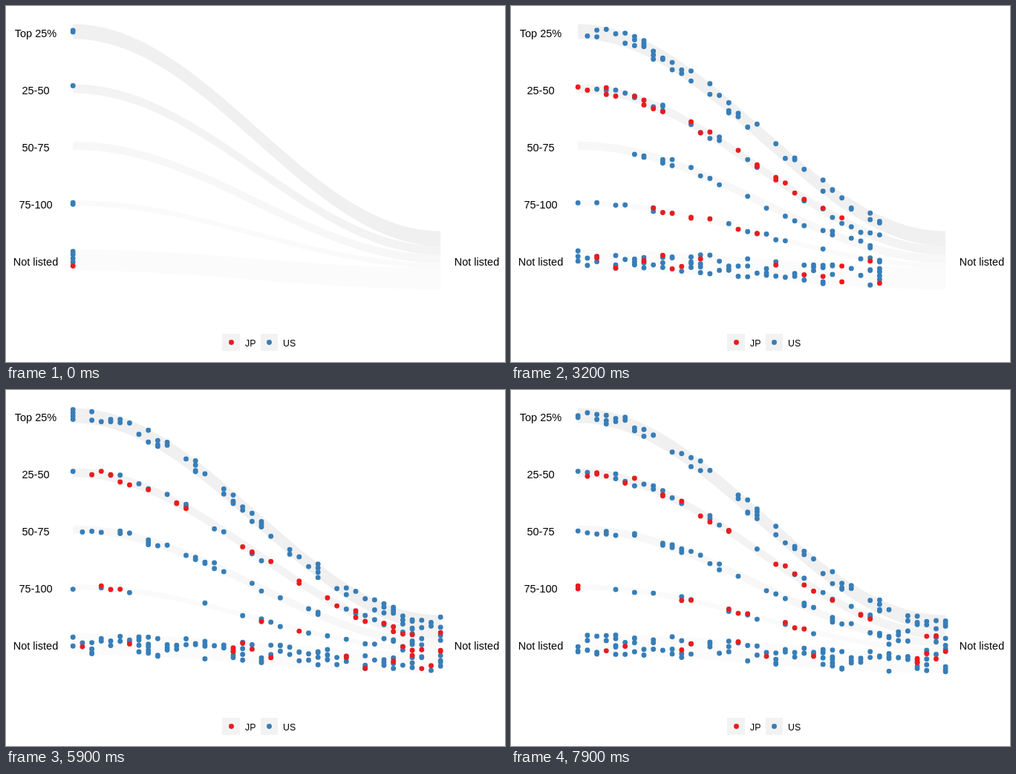
Write an HTML page that moves like this. It is 672x480 px and loops after 8000 ms.

```html
<!DOCTYPE html>
<html lang="en">
<head>
<meta charset="utf-8">
<title>Flow to Not listed</title>
<style>
  html, body { margin: 0; width: 100%; height: 100%; overflow: hidden; background: #fff; }
  svg { display: block; }
  text { font-family: "Liberation Sans", Arial, sans-serif; font-size: 14.5px; fill: #000; }
  .label { text-anchor: middle; }
  .key { font-size: 12.3px; }
  .box { fill: #f2f2f2; }
  .dots { fill: none; stroke-width: 6.9; stroke-linecap: round; }
  .us { stroke: #377eb8; }
  .jp { stroke: #e81c1e; }
</style>
</head>
<body>
<svg width="672" height="480" viewBox="0 0 672 480">
  <g id="bands"></g>
  <path id="us" class="dots us"/>
  <path id="jp" class="dots jp"/>
  <g id="labels"></g>
  <rect class="box" x="291" y="442" width="24" height="23"/>
  <rect class="box" x="343" y="442" width="23" height="23"/>
  <path class="dots jp" d="M303.5 453.5h0"/>
  <path class="dots us" d="M354.5 453.5h0"/>
  <text class="key" x="322" y="459">JP</text>
  <text class="key" x="373" y="459">US</text>
</svg>
<script>
const LEFT = 90.2, RIGHT = 585.2, LAST = 39, STEPS = 79;

// y0, y1: band centre at each end; jp: steps at which a red dot sets off;
// us: mean number of blue dots per step; first: blue offsets at step 0
const rows = [
  { name: 'Top 25%', y0: 34.5, y1: 313.5, h: 20, fill: '#f0f0f0', us: 1.65, first: [-1.5, 0.5], jp: [] },
  { name: '25-50', y0: 111.5, y1: 329.5, h: 12, fill: '#f3f3f3', us: 0.75, first: [-4], jp: [
    4, 6, 8, 9, 10, 11, 11, 13, 13, 15, 18, 19, 20, 23, 24, 25, 25, 26, 28, 29, 29, 31, 32, 35, 35, 38,
    40, 41, 47, 48, 48, 51, 53, 54, 55, 56, 57, 62, 62, 64, 65, 67, 69, 69, 72, 73, 75, 76, 76, 77] },
  { name: '50-75', y0: 188.3, y1: 341, h: 11, fill: '#f7f7f7', us: 1, first: [], jp: [] },
  { name: '75-100', y0: 265.7, y1: 350, h: 7, fill: '#fafafa', us: 0.45, first: [-0.5, 1.5], jp: [
    1, 13, 15, 18, 20, 20, 22, 23, 24, 35, 39, 54, 55, 56, 60, 61, 62, 66, 67, 78, 78] },
  { name: 'Not listed', y0: 342.5, y1: 367.7, h: 28.5, fill: '#fbfbfb', us: 2.6, first: [-11.5, -7.5, -2, 3], jp: [
    0, 4, 4, 6, 8, 11, 19, 21, 22, 23, 25, 25, 28, 30, 30, 38,
    40, 41, 42, 42, 53, 58, 61, 66, 67, 73, 75] }
];

const $ = id => document.getElementById(id);
const xAt = p => LEFT + (RIGHT - LEFT) * p;
const yAt = (row, p) => row.y0 + (row.y1 - row.y0) * (1 - Math.cos(Math.PI * p)) / 2;

let seed = 20;
const random = () => (seed = seed * 16807 % 2147483647) / 2147483647;
const spread = row => (random() - 0.5) * (row.h - 1);

function bandPath(row) {
  const top = [], bottom = [];
  for (let i = 0; i <= 100; i++) {
    const x = xAt(i / 100).toFixed(1), y = yAt(row, i / 100);
    top.push(`${x} ${(y - row.h / 2).toFixed(1)}`);
    bottom.unshift(`${x} ${(y + row.h / 2).toFixed(1)}`);
  }
  return `M${top.concat(bottom).join('L')}Z`;
}

const label = (name, x, y) => `<text class="label" x="${x}" y="${y}">${name}</text>`;

$('bands').innerHTML = rows.map(r => `<path d="${bandPath(r)}" fill="${r.fill}"/>`).join('');
$('labels').innerHTML = rows.map((r, i) => label(r.name, 40, 42 + 77 * i)).join('')
  + label('Not listed', 634, 350);

const us = [], jp = [];
for (const row of rows) {
  for (const off of row.first) us.push({ row, start: 0, off });
  for (let start = 1; start < STEPS; start++)
    for (let i = 0; i < 6; i++)
      if (random() < row.us / 6) us.push({ row, start, off: spread(row) });
  for (const start of row.jp) jp.push({ row, start, off: start ? spread(row) : 8 });
}

function dotPath(dots, step) {
  return dots.filter(d => d.start <= step && step - d.start <= LAST).map(d => {
    const p = (step - d.start) / LAST;
    return `M${xAt(p).toFixed(1)} ${(yAt(d.row, p) + d.off).toFixed(1)}h0`;
  }).join('');
}

const begin = performance.now();
let shown = -1;
function draw() {
  const tick = Math.floor((performance.now() - begin) % 8000 / 100);
  const step = tick > 64 ? tick - 1 : tick; // the flow rests for one tick
  if (step !== shown) {
    shown = step;
    $('us').setAttribute('d', dotPath(us, step));
    $('jp').setAttribute('d', dotPath(jp, step));
  }
  requestAnimationFrame(draw);
}
draw();
</script>
</body>
</html>
```
